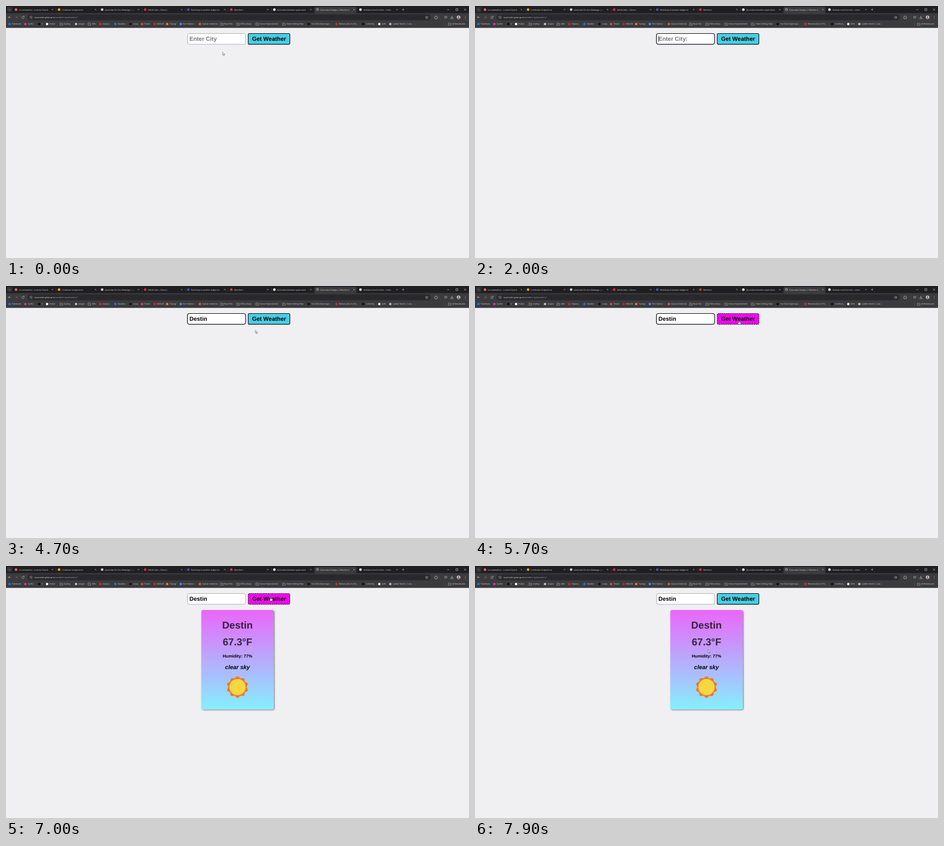
An HTML page that plays this animation: 800 by 435 pixels, repeating every 8000 ms.

```html
<!DOCTYPE html>
<html lang="en">
<head>
<meta charset="utf-8">
<title>Weather application</title>
<style>
  html, body { margin: 0; width: 100%; height: 100%; overflow: hidden; background: #f0eff2; }
  svg { display: block; width: 800px; height: 435px; text-rendering: geometricPrecision; }
  .ui text { font: 3.45px "Open Sans", "Noto Sans", sans-serif; fill: #dedee0; }
  .ui path, .ui .line { fill: none; stroke: #d0d0d2; stroke-width: .6; }
  .ui .dim { fill: #a2a2a6; }
  .page text { font: bold 10px "Liberation Sans", Arial, sans-serif; }
  .mid { text-anchor: middle; }
</style>
</head>
<body>
<svg id="stage" viewBox="0 0 800 435">
  <defs>
    <linearGradient id="sky" x1="0" y1="0" x2="0" y2="1">
      <stop offset="0" stop-color="#ea66fa"/>
      <stop offset="1" stop-color="#85effe"/>
    </linearGradient>
    <filter id="shade" x="-10%" y="-10%" width="120%" height="120%">
      <feDropShadow dx="1" dy="1" stdDeviation=".8" flood-color="#000" flood-opacity=".55"/>
    </filter>
  </defs>
  <rect width="800" height="435" fill="#f0eff2"/>
  <g class="ui" id="chrome"></g>
  <g class="page">
    <rect id="field" x="313.5" y="47.5" width="100.5" height="18.6" rx="3.5" fill="#fff"/>
    <text id="entry" x="317" y="60.2"></text>
    <rect id="caret" y="51.5" width=".8" height="10.5" fill="#222"/>
    <rect id="button" x="418.5" y="47.5" width="72" height="18.6" rx="2"/>
    <text class="mid" x="454.5" y="60.2">Get Weather</text>
    <g id="card">
      <rect x="337.5" y="76" width="125.3" height="171.5" rx="3" fill="url(#sky)" filter="url(#shade)"/>
      <g class="mid">
        <g fill="#000" fill-opacity=".75">
          <text x="400" y="107.6" style="font-size:17.3px">Destin</text>
          <text x="400" y="137.2" style="font-size:17.3px">67.3°F</text>
        </g>
        <text x="400" y="157.6" style="font-size:7.4px">Humidity: 77%</text>
        <text x="400" y="177.8" style="font-style:italic">clear sky</text>
      </g>
      <g id="sun"></g>
    </g>
  </g>
  <g id="arrow" fill="#fff" stroke="#444" stroke-width=".55">
    <path d="M0 0V5.2L1.2 4.2L2 6L2.9 5.6L2.1 3.9H3.7Z"/>
  </g>
  <g id="beam" fill="none" stroke="#777" stroke-width=".6">
    <path d="M-1.1 -2.9H1.1M0 -2.9V2.9M-1.1 2.9H1.1"/>
  </g>
  <g id="hand" fill="#fff" stroke="#333" stroke-width=".5">
    <path d="M-.6 -3Q0 -3.7 .5 -3V-.8L2.9 -.1Q3.5 .2 3.2 1.4L2.6 3.6H-.7L-2.3 1Q-2 .2 -.6 1Z"/>
  </g>
</svg>
<script>
const $ = id => document.getElementById(id);
const LOOP = 8000;

const rect = (x, y, w, h, fill, r = 0) =>
  `<rect x="${x}" y="${y}" width="${w}" height="${h}" rx="${r}" fill="${fill}"/>`;
const dot = (x, y, r, fill) => `<circle cx="${x}" cy="${y}" r="${r}" fill="${fill}"/>`;
const label = (x, y, s, cls = "") => `<text x="${x}" y="${y}" class="${cls}">${s}</text>`;
const path = (d, style = "") => `<path d="${d}" style="${style}"/>`;
const folder = x => path(`M${x - 2.2} 29.3h1.7l.6 .7h2.2v3.1h-4.5z`, "stroke-width:.5");

const tabs = [
  ["css animations - Lumora Search", "#e8695c"],
  ["Corebeam Integrations", "#f4a62a"],
  ["Javascript On Our Webpage | J", "#d9c6c4"],
  ["Watch later - Clipora", "#e02b2b"],
  ["Bootstrap 4 weather widget wi", "#3c55b5"],
  ["Members", "#d23a34"],
  ["Quorvales/weather-application", "#f4f4f4"],
  ["Quorvales Designs | Weather A", ""],
  ["desktop record screen - Lumo", "#ece6e4"]
];

// icon x, text x, label, icon colour (none means folder)
const marks = [
  [6, 10, "Palebrook", "#1877e8"], [33.5, 38, "Quillo", "#d03aa0"],
  [57.5, 61.5, "V", "#0c0c0c"], [71, 75, "Forkel", "#f2f2f2"],
  [95.5, 100, "Coding"], [121, 125, "uVapor", "#b8b8ba"],
  [144, 149, "Bills"], [163, 167, "Clipora", "#e02626"],
  [189, 193, "Stowbin", "#2272e6"], [215, 220, "ovaq", "#141414"],
  [235, 239, "Tmote", "#dc4a3c"], [257, 261, "MOLVO", "#d3241f"],
  [278.5, 283, "Twangl", "#ee7a30"], [302, 306, "Port Harbor", "#4b8bd8"],
  [335, 339, "Queue Underrun", "#c9642e"], [373, 377, "Boat Shit"],
  [401, 405, "Office Ideas"], [434, 438, "Home Improvement"],
  [480, 485, "Video Editing Help"], [523, 528, "Far Desk Openings:...", "#0f0f10"],
  [571, 575, "Remote Jobs in Pro...", "#c83232"], [617, 622, "SoloEntry", "#101010"],
  [645, 649, "QVN", "#f0dfe0"], [664, 668, "Ladder Sketch | Lad...", "#b4b4b8"]
];

function drawChrome() {
  let s = rect(0, 0, 800, 13, "#1f1f22") + rect(0, 12.3, 800, 25.5, "#3b3b3e");
  s += rect(533, 1.4, 72.5, 13, "#3b3b3e", 2.5);
  s += rect(2, 1.8, 8.6, 8.6, "#343437", 2.6) + path("M5 5.6L6.3 6.9L7.6 5.6");
  tabs.forEach(([name, color], i) => {
    const x = 17.3 + i * 74.4;
    s += color ? dot(x, 6.2, 2.2, color)
      : `<circle class="line" cx="${x}" cy="6.2" r="2"/>` + path(`M${x - 1.6} 5.2h2l1 2`);
    s += label(x + 4.9, 7.5, name);
    s += path(`M${x + 61.9} 5.1l2.2 2.2m0 -2.2l-2.2 2.2`, "stroke-width:.5");
    if (i < 6) s += rect(x + 69, 3.8, .4, 5, "#4a4a4d");
  });
  s += path("M684.5 6.2h3.4M686.2 4.5v3.4");
  s += path("M762.4 6.3h3.4M777.4 4.6h3.3v3.3h-3.3zM791.6 4.6l3.3 3.3m0 -3.3l-3.3 3.3");

  s += path("M8.3 19.5H4.2M6 17.7L4.2 19.5L6 21.3");
  s += path("M15.6 19.5H19.7M17.9 17.7L19.7 19.5L17.9 21.3", "stroke:#77777a");
  s += path("M31.1 18.6A1.9 1.9 0 1 0 31.3 20.2M31.4 17.4V18.8H30");
  s += rect(37, 14.6, 697, 10, "#29292c", 5) + dot(43.2, 19.5, 3.4, "#3f3f43");
  s += path("M41.6 18.5h1.6M44.3 18.5h.5M41.6 20.6h.5M43.3 20.6h1.6");
  s += `<text x="49.3" y="20.9" style="font-size:3.75px">quorvales.grenup.io<tspan class="dim">/weather-applications/</tspan></text>`;
  s += path("M727 17.2L727.7 18.8L729.3 18.9L728.1 20L728.5 21.6L727 20.7L725.5 21.6L725.9 20L724.7 18.9L726.3 18.8Z", "stroke-width:.5");
  s += path("M741 18h1.2a.8 .8 0 0 1 1.6 0h1.2v1.3a.8 .8 0 0 1 0 1.6v1.1h-4z");
  s += path("M757.6 18h4M757.6 19.6h2.5M757.6 21.2h1.6M761.3 21.3v-2.4h1");
  s += path("M770.6 17.2v3M769.2 19l1.4 1.4l1.4 -1.4M768.5 20.5v1.3h4.2v-1.3");
  s += dot(782, 19.5, 3.1, "#d8ccc8") + dot(782, 18.7, 1.1, "#775a51")
    + `<path d="M780 21.8a2 2 0 0 1 4 0z" style="fill:#775a51;stroke:none"/>`;
  for (const y of [17.9, 19.5, 21.1]) s += dot(793.3, y, .45, "#d6d6d8");

  for (const [ix, tx, name, color] of marks)
    s += (color ? dot(ix, 31.1, 2.2, color) : folder(ix)) + label(tx, 32.4, name);
  s += rect(759, 28.4, .4, 5.4, "#66666a") + folder(766.6) + label(771, 32.4, "All Bookmarks");
  $("chrome").innerHTML = s;
}

function drawSun() {
  let s = dot(400, 209, 16, "#f8722f");
  for (let i = 0; i < 10; i++) {
    const a = i * Math.PI / 5;
    s += dot(400 + 15.2 * Math.sin(a), 209 - 15.2 * Math.cos(a), 3.3, "#f8722f");
  }
  $("sun").innerHTML = s + dot(400, 209, 14, "#f4d83e");
}

// each track lists [start ms, value...]; a value holds until the next step
const pointer = [
  [0, "arrow", 374.4, 79.6], [100, "beam", 366, 60], [400, "beam", 365.5, 57],
  [3800, "arrow", 430, 66.5], [3900, "hand", 458, 60], [4200, "hand", 456, 59],
  [4500, "arrow", 440, 68.3], [4700, "arrow", 431, 76.4], [4900, "arrow", 432, 78],
  [5000, "arrow", 435, 79.2], [5100, "arrow", 439, 79.5], [5300, "arrow", 445, 79],
  [5400, "arrow", 449, 78], [5600, "arrow", 453, 73], [5700, "hand", 456, 63],
  [5800, "hand", 458, 59], [5900, "hand", 458.5, 57.5], [6100, "hand", 457.4, 57],
  [7300, "arrow", 416, 162], [7500, "arrow", 411, 156], [7600, "arrow", 408, 152],
  [7700, "arrow", 406, 149], [7800, "arrow", 404, 146], [7900, "arrow", 402.8, 144.4]
];
const typing = [[0, 0], [2300, 1], [2400, 2], [2500, 3], [2600, 4], [2800, 6]];
const blink = [[0, 0], [500, 1], [1500, 0], [2000, 1], [3300, 0], [3800, 1],
  [4300, 0], [4900, 1], [5300, 0], [5800, 1], [6300, 0]];
const focus = [[0, 0], [400, 1], [6300, 0]];
const hover = [[0, 0], [4200, 1], [4500, 0], [5700, 1], [7300, 0]];
const card = [[0, 0], [7000, 1]];

const at = (track, t) => track.findLast(step => step[0] <= t).slice(1);
const show = (id, on) => $(id).setAttribute("visibility", on ? "visible" : "hidden");
const set = (id, attrs) => {
  for (const k in attrs) $(id).setAttribute(k, attrs[k]);
};

function render(t) {
  const [kind, x, y] = at(pointer, t);
  for (const id of ["arrow", "beam", "hand"]) show(id, id === kind);
  set(kind, { transform: `translate(${x} ${y})` });

  const [count] = at(typing, t);
  const text = "Destin".slice(0, count);
  const entry = $("entry");
  if (entry.textContent !== (text || "Enter City")) entry.textContent = text || "Enter City";
  set("entry", { fill: text ? "#000" : "#757575" });
  set("caret", { x: text ? 317 + entry.getComputedTextLength() - .2 : 316.6 });
  show("caret", at(blink, t)[0]);

  const focused = at(focus, t)[0];
  set("field", { stroke: focused ? "#1c1c1e" : "#b4b4b8", "stroke-width": focused ? 1.2 : 1 });
  const over = at(hover, t)[0];
  set("button", {
    fill: over ? "#ef06ef" : "#49cde4",
    stroke: over ? "#2a0a2c" : "#111820",
    "stroke-width": 1.1,
    "stroke-dasharray": over ? "2 1.2" : "none"
  });
  show("card", at(card, t)[0]);
}

drawChrome();
drawSun();
const start = performance.now();
function tick() {
  render((performance.now() - start) % LOOP);
  requestAnimationFrame(tick);
}
tick();
</script>
</body>
</html>
```
